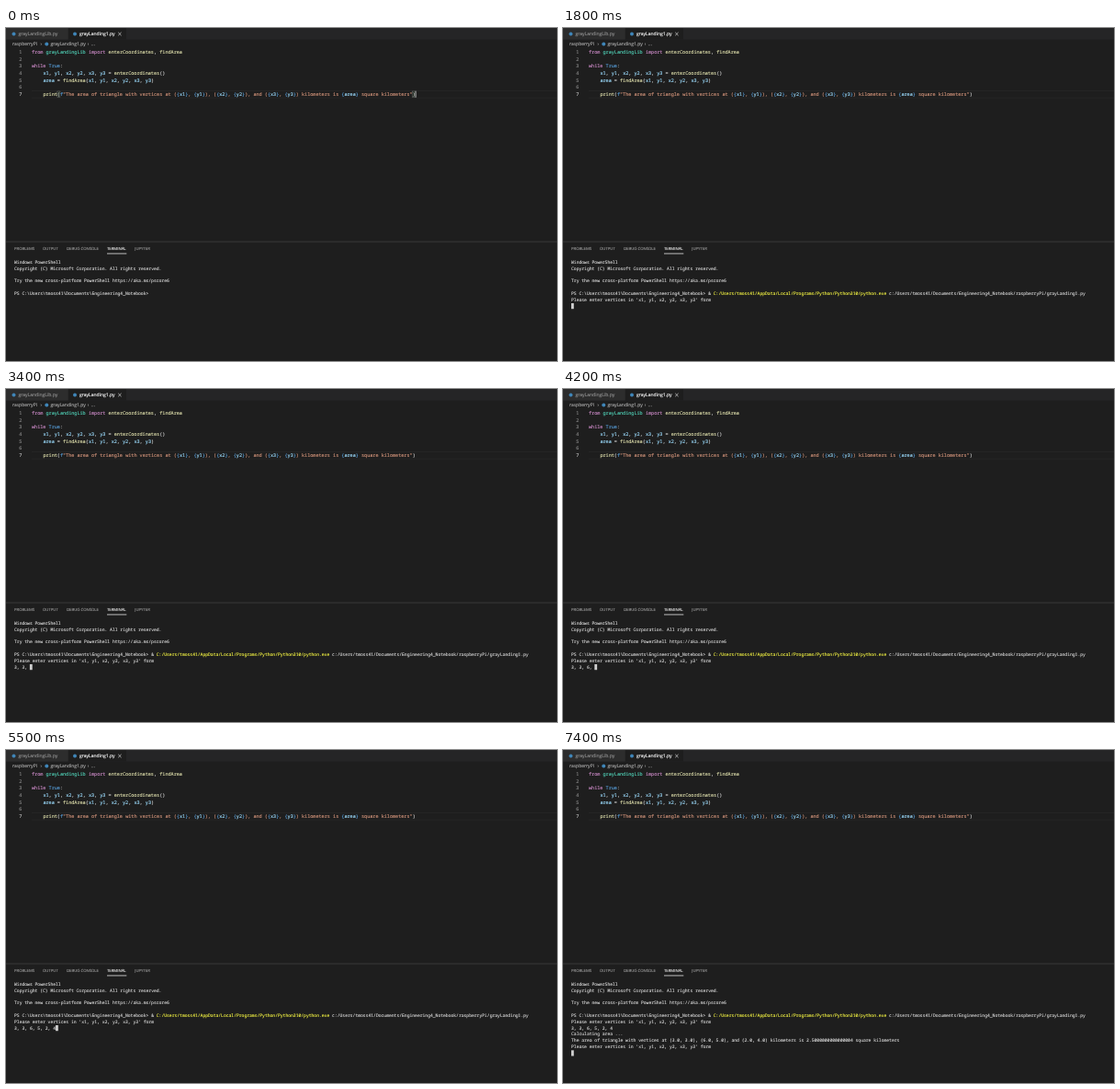
These frames come from a looping animation (600 px wide and 363 px high, 8 s). An HTML page:

```html
<!DOCTYPE html>
<html lang="en">
<head>
<meta charset="utf-8">
<title>Code editor and terminal</title>
<style>
  html, body { margin: 0; width: 100%; height: 100%; overflow: hidden; background: #1e1e1e; }
  svg { display: block; width: 100%; height: 100%; }
  text { text-rendering: geometricPrecision; stroke-width: .13px; }
  .mono { font-family: "Noto Sans Mono", "Liberation Mono", monospace; }
  .ui { font-family: "Open Sans", "Noto Sans", sans-serif; }
</style>
</head>
<body>
<svg id="stage" viewBox="0 0 600 363" preserveAspectRatio="none"></svg>
<script>
const LOOP = 8000;
const stage = document.getElementById('stage');

function add(tag, attrs, parent = stage) {
  const el = document.createElementNS('http://www.w3.org/2000/svg', tag);
  for (const key in attrs) el.setAttribute(key, attrs[key]);
  parent.append(el);
  return el;
}
const rect = (x, y, width, height, fill, parent) => add('rect', { x, y, width, height, fill }, parent);
const dot = (cx, cy) => add('circle', { cx, cy, r: 2, fill: '#3f85b8' });

function label(str, x, y, size, fill) {
  add('text', { x, y, 'font-size': size, fill, stroke: fill, class: 'ui' }).textContent = str;
}

// Monospaced line: each word sits on its own column of the character grid.
function mono(parts, grid, row, parent = stage) {
  const line = add('text', { y: grid.y + row * grid.step, 'font-size': grid.size, class: 'mono' }, parent);
  let col = 0;
  for (const [str, fill] of parts) {
    for (const word of str.matchAll(/\S+/g)) {
      const x = grid.x + (col + word.index) * grid.pitch;
      add('tspan', { x, fill, stroke: fill }, line).textContent = word[0];
    }
    col += str.length;
  }
  return line;
}

const EDIT = { x: 28, y: 27.9, pitch: 3.095, step: 7.65, size: 5.157 };
const TERM = { x: 9, y: 256.8, pitch: 2.814, step: 6.83, size: 4.69 };
const FLOW = '#c586c0', NAME = '#9cdcfe', FUNC = '#dcdcaa', STR = '#ce9178',
      WORD = '#569cd6', TYPE = '#4ec9b0', PLAIN = '#d4d4d4', OUT = '#d4d4d4';

// Tabs and breadcrumb
rect(0, 0, 600, 363, '#1e1e1e');
rect(0, 0, 600, 12.5, '#252526');
rect(0, 0, 67.5, 12.5, '#2d2d2d');
rect(68, 0, 63, 12.5, '#1e1e1e');
dot(8.5, 6.4);
label('grayLandingLib.py', 13.5, 8.4, 5.05, '#8f8f8f');
dot(75, 6.4);
label('grayLanding1.py', 80, 8.4, 5.05, '#ffffff');
add('path', { d: 'M122.2 4.8l3.4 3.4m0-3.4l-3.4 3.4', stroke: '#dddddd', 'stroke-width': .7 });
label('raspberryPi', 7, 19.1, 5, '#a9a9a9');
label('›', 37.5, 19.1, 5, '#a9a9a9');
dot(44.3, 17.5);
label('grayLanding1.py', 48.5, 19.1, 5, '#a9a9a9');
label('›', 88.8, 19.1, 5, '#a9a9a9');
label('...', 93, 19.1, 5, '#a9a9a9');

// Editor
for (const y of [68.2, 75.8]) rect(28, y, 572, .6, '#2a2a2a');

const splitVars = str => str.split(/([{}])/).map((part, i, all) =>
  /[{}]/.test(part) ? [part, WORD] : [part, all[i - 1] === '{' ? NAME : STR]);
const variables = str => str.split(/(\w+)/).map(part => [part, /\w/.test(part) ? NAME : PLAIN]);

const code = [
  [['from ', FLOW], ['grayLandingLib ', TYPE], ['import ', FLOW], ['enterCoordinates', FUNC], [', ', PLAIN], ['findArea', FUNC]],
  [],
  [['while ', FLOW], ['True', WORD], [':', PLAIN]],
  [...variables('    x1, y1, x2, y2, x3, y3 = '), ['enterCoordinates', FUNC], ['()', PLAIN]],
  [...variables('    area = '), ['findArea', FUNC], ...variables('(x1, y1, x2, y2, x3, y3)')],
  [],
  [['    print', FUNC], ['(', PLAIN], ['f', WORD],
   ...splitVars('"The area of triangle with vertices at ({x1}, {y1}), ({x2}, {y2}), and ({x3}, {y3}) kilometers is {area} square kilometers"'),
   [')', PLAIN]]
];

const brackets = add('g', {});
for (const col of [9, 134]) {
  add('rect', { x: EDIT.x + col * EDIT.pitch, y: 69, width: EDIT.pitch, height: 6.6,
    fill: '#1c261c', stroke: '#888888', 'stroke-width': .4 }, brackets);
}
code.forEach((parts, row) => {
  mono([[String(row + 1), row === 6 ? '#c6c6c6' : '#858585']], { ...EDIT, x: 14.2 }, row);
  if (parts.length) mono(parts, EDIT, row);
});
const caret = rect(EDIT.x + 135 * EDIT.pitch, 68.6, .7, 7.2, '#d0d0d0');

// Panel
rect(0, 232.6, 600, .8, '#404040');
[['PROBLEMS', 9], ['OUTPUT', 40], ['DEBUG CONSOLE', 66], ['TERMINAL', 110], ['JUPYTER', 140.3]]
  .forEach(([name, x]) => label(name, x, 241.6, 4.28, name === 'TERMINAL' ? '#e7e7e7' : '#979797'));
rect(110, 245.5, 21.3, .9, '#d0d0d0');

// Terminal
const user = 'tmoss41';
const ask = "Please enter vertices in 'x1, y1, x2, y2, x3, y3' form";
const say = (str, row) => mono([[str, OUT]], TERM, row);
say('Windows PowerShell', 0);
say('Copyright (C) Microsoft Corporation. All rights reserved.', 1);
say('Try the new cross-platform PowerShell https://aka.ms/pscore6', 3);
const prompt = `PS C:\\Users\\${user}\\Documents\\Engineering4_Notebook>`;
say(prompt, 5);

const command = mono([
  [' '.repeat(prompt.length) + ' & ', OUT],
  [`C:/Users/${user}/AppData/Local/Programs/Python/Python310/python.exe `, '#f5f543'],
  [`c:/Users/${user}/Documents/Engineering4_Notebook/raspberryPi/grayLanding1.py`, OUT]
], TERM, 5);

// [element, time it appears]
const shown = [
  [command, 100],
  [say(ask, 6), 300],
  [say('Calculating area ...', 8), 5700],
  [say('The area of triangle with vertices at (3.0, 3.0), (6.0, 5.0), and (2.0, 4.0) kilometers is 2.5000000000000004 square kilometers', 9), 5800],
  [say(ask, 10), 5800]
];

const input = '3, 3, 6, 5, 2, 4';
const keyTimes = [2100, 2300, 2400, 2700, 3200, 3400, 3700, 4000, 4100, 4400, 4500, 4600, 4900, 5100, 5300, 5500];
[...input].forEach((ch, i) => {
  if (ch !== ' ') shown.push([say(' '.repeat(i) + ch, 7), keyTimes[i]]);
});
const block = rect(0, 0, TERM.pitch, 6.2, '#cfcfcf');

const FOCUS = 1400;
const show = (el, on) => el.setAttribute('visibility', on ? 'visible' : 'hidden');

function draw(t) {
  for (const [el, start] of shown) show(el, t >= start);
  show(brackets, t < FOCUS);
  show(caret, t < 100 || (t >= 600 && t < 1100));

  const typed = keyTimes.filter(k => t >= k).length;
  const row = t >= 5800 ? 11 : t >= 5700 ? 9 : 7;
  show(block, t >= FOCUS);
  block.setAttribute('x', TERM.x + (row === 7 ? typed * TERM.pitch : 0));
  block.setAttribute('y', TERM.y + row * TERM.step - 4.6);
}

const begin = performance.now();
function tick() {
  draw((performance.now() - begin) % LOOP);
  requestAnimationFrame(tick);
}
tick();
</script>
</body>
</html>
```
